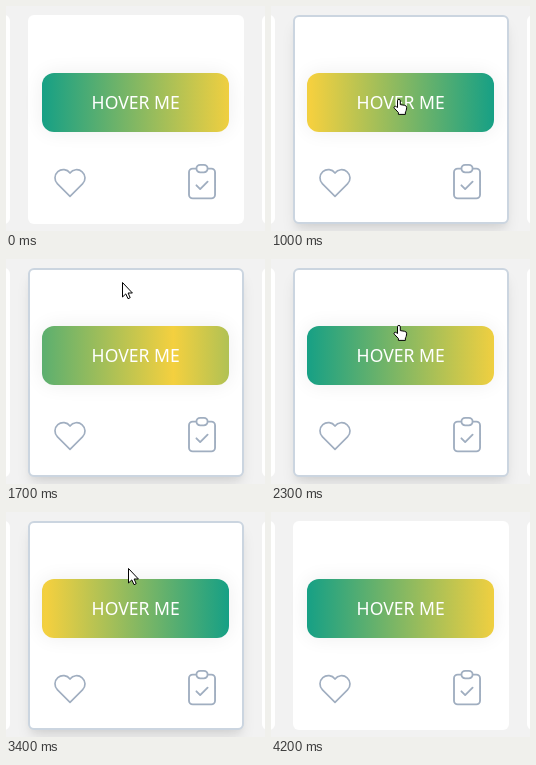
An HTML page for the animation above (4.6 s loop, 259 by 225 pixels).

```html
<!DOCTYPE html>
<html lang="en">
<head>
<meta charset="utf-8">
<title>Hover button</title>
<style>
  html, body { margin: 0; width: 100%; height: 100%; overflow: hidden; background: #f2f2f2; }
  #card, #btn, svg { position: absolute; box-sizing: border-box; }
  svg { left: 0; top: 0; width: 100%; height: 100%; overflow: hidden; }
  #card {
    left: 22px; top: 9px; width: 216px; height: 209px;
    border: 2px solid transparent; border-radius: 6px; background: #fff;
  }
  #btn {
    left: 36px; top: 67px; width: 187px; height: 59px; border-radius: 12px;
    background: linear-gradient(to right, #16a085 0%, #f4d03f 51%, #16a085 100%) 0 0 / 200% 100%;
    box-shadow: 0 0 20px #eee;
  }
  text { font: 17.6px "Noto Sans", "Open Sans", sans-serif; fill: #fff; text-anchor: middle; }
  .icon { fill: none; stroke: #a0aec0; stroke-width: 1; stroke-linecap: round; stroke-linejoin: round; }
  .cursor { fill: #fff; stroke: #000; stroke-linejoin: round; }
</style>
</head>
<body>
<svg fill="#fff">
  <rect x="-212" y="9" width="216" height="209" rx="6"/>
  <rect x="256" y="9" width="216" height="209" rx="6"/>
</svg>
<div id="card"></div>
<div id="btn"></div>
<svg>
  <text x="129.7" y="103">HOVER ME</text>
  <g class="icon">
    <path transform="translate(44 157) scale(1.667)" d="M19.5 12.572L12 20l-7.5-7.428A5 5 0 1 1 12 6.006a5 5 0 1 1 7.5 6.572"/>
    <path transform="translate(173.7 153.3) scale(1.86)" d="M9 5H7a2 2 0 0 0-2 2v12a2 2 0 0 0 2 2h10a2 2 0 0 0 2-2V7a2 2 0 0 0-2-2h-2M9 5a2 2 0 0 0 2 2h2a2 2 0 0 0 0-4h-2a2 2 0 0 0-2 2M9 14l2 2 4-4"/>
  </g>
  <path class="cursor" id="arrow" d="M.5 .5V15L3.8 11.9 6 16.7 8.2 15.7 6.1 11H10.4Z"/>
  <path class="cursor" id="hand" d="M-.5 8.5V1.8a1.4 1.4 0 0 1 2.8 0V5.6l4.4 .7q2.2 .4 2 2.5l-.5 2.6q-.3 1-.8 1.6V15.4H.4V13.5L-3.7 9.2q-.8-1.2 .3-1.8 1-.4 1.9 .4Z"/>
</svg>
<script>
  const LOOP = 4600, STEP = 100, BTN_W = 187;
  const get = id => document.getElementById(id);
  const card = get('card'), btn = get('btn'), arrow = get('arrow'), hand = get('hand');

  const entry = { x: 112, y: 5 };
  const moves = [
    { at: 200, dur: 400, x: 127, y: 93 },
    { at: 1330, dur: 370, x: 116, y: 23 },
    { at: 1970, dur: 600, x: 129, y: 74 },
    { at: 3275, dur: 500, x: 112, y: 30 },
    { at: 3800, dur: 200, x: 110, y: -20 }
  ];

  // CSS "ease": cubic-bezier(.25, .1, .25, 1)
  function ease(x) {
    if (x <= 0) return 0;
    if (x >= 1) return 1;
    const bez = (a, b, s) => 3 * a * s * (1 - s) ** 2 + 3 * b * s * s * (1 - s) + s ** 3;
    let lo = 0, hi = 1;
    for (let i = 0; i < 24; i++) {
      const mid = (lo + hi) / 2;
      if (bez(.25, .25, mid) < x) lo = mid; else hi = mid;
    }
    return bez(.1, 1, lo);
  }

  const hover = (t, on, off, dur) => ease((t - on) / dur) - ease((t - off) / dur);

  function pointer(t) {
    let { x, y } = entry;
    for (const m of moves) {
      const k = ease((t - m.at) / m.dur);
      x += (m.x - x) * k;
      y += (m.y - y) * k;
    }
    return { x: Math.round(x), y: Math.round(y) };
  }

  function draw(t) {
    const slide = hover(t, 445, 1500, 500) + hover(t, 2500, 3400, 500);
    btn.style.backgroundPosition = `${-slide * BTN_W}px 0`;

    const lift = hover(t, 150, 3880, 300);
    card.style.borderColor = `rgba(203, 213, 224, ${lift})`;
    card.style.boxShadow =
      `0 10px 15px -3px rgba(0, 0, 0, ${.1 * lift}), 0 4px 6px -2px rgba(0, 0, 0, ${.05 * lift})`;

    const { x, y } = pointer(t), over = y >= 65;
    const shown = t < moves[0].at ? null : over ? hand : arrow;
    for (const c of [arrow, hand]) c.style.display = c === shown ? '' : 'none';
    if (shown) shown.setAttribute('transform', `translate(${x} ${y})`);
  }

  const start = performance.now();
  function tick() {
    const t = (performance.now() - start) % LOOP;
    draw(Math.floor(t / STEP) * STEP);
    requestAnimationFrame(tick);
  }
  draw(0);
  requestAnimationFrame(tick);
</script>
</body>
</html>
```
